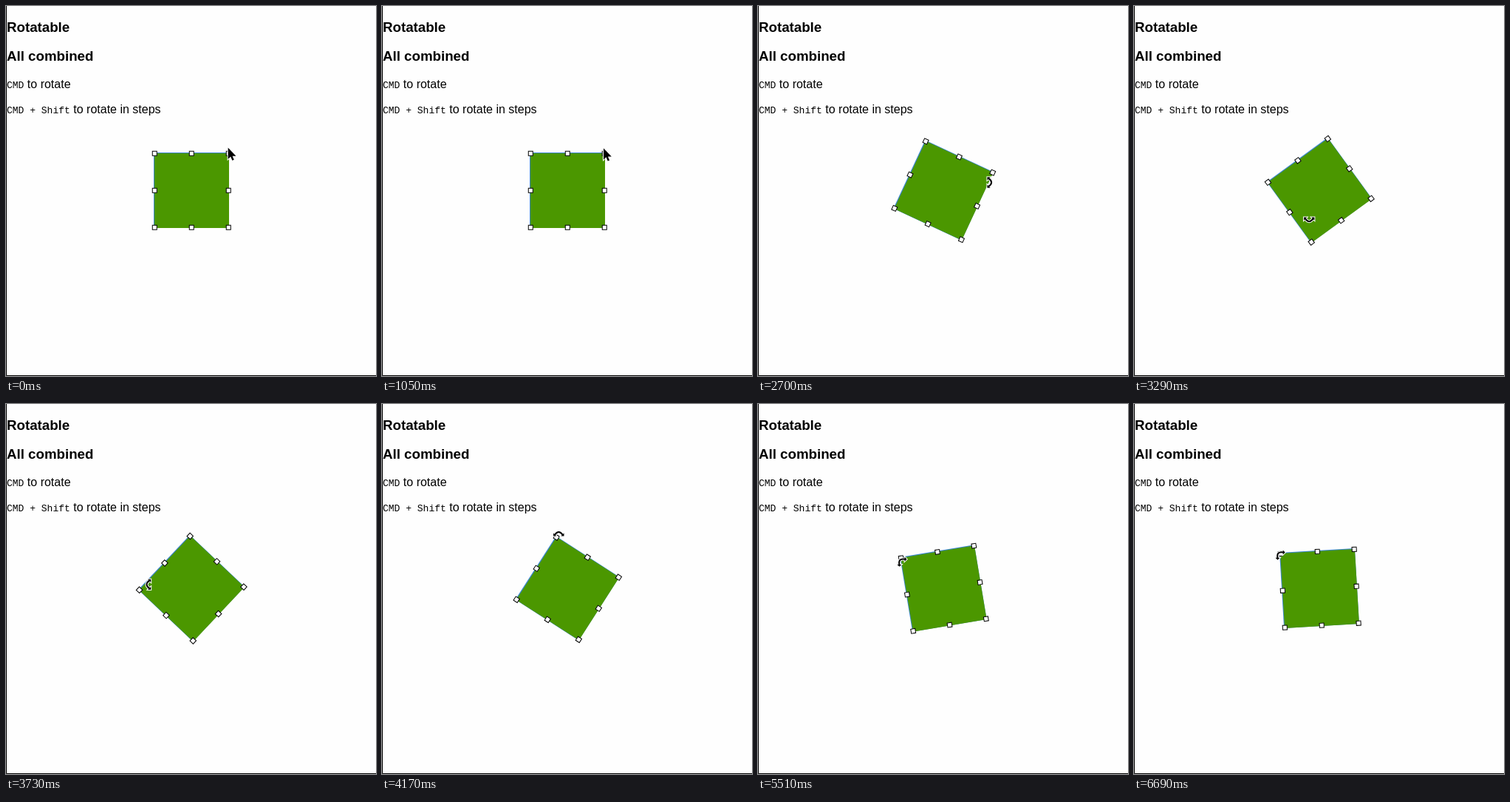
An HTML page for the animation above (8000 ms loop, 501 by 500 pixels).

```html
<!DOCTYPE html>
<html lang="en">
<head>
<meta charset="utf-8">
<title>Rotatable</title>
<style>
  html, body { margin: 0; width: 100%; height: 100%; overflow: hidden; background: #fefefe; }
  svg { display: block; width: 100%; height: 100%; }
  text { font: 16px "Liberation Sans", Arial, sans-serif; }
  .title { font-size: 18.72px; font-weight: bold; }
  .key { font: 13px "Liberation Mono", "Courier New", monospace; }
  .handle { fill: #fff; stroke: #000; }
</style>
</head>
<body>
<svg viewBox="0 0 501 500">
  <defs>
    <path id="arc" d="M-5.5 2Q0-6 5.5 2" fill="none"/>
    <path id="heads" d="M-7.2-.5V3.7H-3zM7.2-.5V3.7H3z"/>
  </defs>

  <path d="M.5 0V499.5H501" fill="none" stroke="#000"/>
  <text class="title" x="1" y="35">Rotatable</text>
  <text class="title" x="1" y="74">All combined</text>
  <text x="1" y="111"><tspan class="key">CMD</tspan> to rotate</text>
  <text x="1" y="145"><tspan class="key">CMD + Shift</tspan> to rotate in steps</text>

  <rect id="edge" x="-51" y="-51" width="102" height="102" fill="#3a86d0"/>
  <rect id="fill" x="-50.5" y="-50.5" width="101" height="101" fill="#4b9700"/>
  <g id="handles"></g>

  <path id="arrow" d="M0 0V15.5l3.5-3.4 2.2 5.2 2.4-1-2.2-5.1h4.9z" stroke="#fff" stroke-width="2" paint-order="stroke"/>
  <g id="turner">
    <g fill="#fff" stroke="#fff">
      <use href="#arc" stroke-width="4"/>
      <use href="#heads" stroke-width="2"/>
    </g>
    <use href="#arc" stroke="#000" stroke-width="2"/>
    <use href="#heads"/>
  </g>
</svg>
<script>
const $ = id => document.getElementById(id);
const LOOP = 8000, FRAME = 148.6, TURN_FROM = 10;
const CENTER = { x: 251, y: 249 };

// Between moves the pose holds; rotation and bearing are in degrees.
const rest = { rotation: 0, bearing: -49.2, radius: 76 };
const move = (from, to, rotation, bearing, radius) => ({ from, to, rotation, bearing, radius });
const moves = [
  move(3, 5, 0, -44, 64),
  move(5, 7, 0, -49.2, 75),
  move(8, 13, 0, -41.4, 68),
  move(16, 18, 25, -9.5, 64),
  move(18, 22, 144, 109, 42.5),
  move(22, 28, 302.7, 261, 75),
  move(28, 34, 255, 209, 67),
  move(35, 37, 260.5, 212.8, 68),
  move(37, 38, 266.6, 220.4, 71)
];

function poseAt(frame) {
  const pose = { ...rest };
  for (const { from, to, ...goal } of moves) {
    const part = Math.min(1, Math.max(0, (frame - from) / (to - from)));
    for (const name in goal) pose[name] += (goal[name] - pose[name]) * part;
  }
  return pose;
}

for (const x of [-50, 0, 50]) for (const y of [-50, 0, 50]) {
  if (!x && !y) continue;
  const handle = document.createElementNS($("handles").namespaceURI, "rect");
  const attrs = { class: "handle", x: x - 3, y: y - 3, width: 6, height: 6 };
  for (const name in attrs) handle.setAttribute(name, attrs[name]);
  $("handles").append(handle);
}

const place = (id, x, y, angle = 0) =>
  $(id).setAttribute("transform", `translate(${x} ${y}) rotate(${angle})`);
const show = (id, visible) => $(id).style.display = visible ? "" : "none";

function draw() {
  const frame = Math.floor(performance.now() % LOOP / FRAME);
  const { rotation, bearing, radius } = poseAt(frame);
  const { x, y } = CENTER;
  const angle = bearing * Math.PI / 180;
  const pointer = [x + radius * Math.cos(angle), y + radius * Math.sin(angle)];

  // The fill sits slightly right and down, so the outline is widest at the upper left.
  place("edge", x, y, rotation);
  place("fill", x + .5, y + .5, rotation);
  place("handles", x + .25, y + .25, rotation);

  // The turning pointer faces outwards in eighths of a circle.
  place("arrow", ...pointer);
  place("turner", ...pointer, Math.round(bearing / 45) * 45 + 90);
  show("arrow", frame < TURN_FROM);
  show("turner", frame >= TURN_FROM);

  requestAnimationFrame(draw);
}
draw();
</script>
</body>
</html>
```
